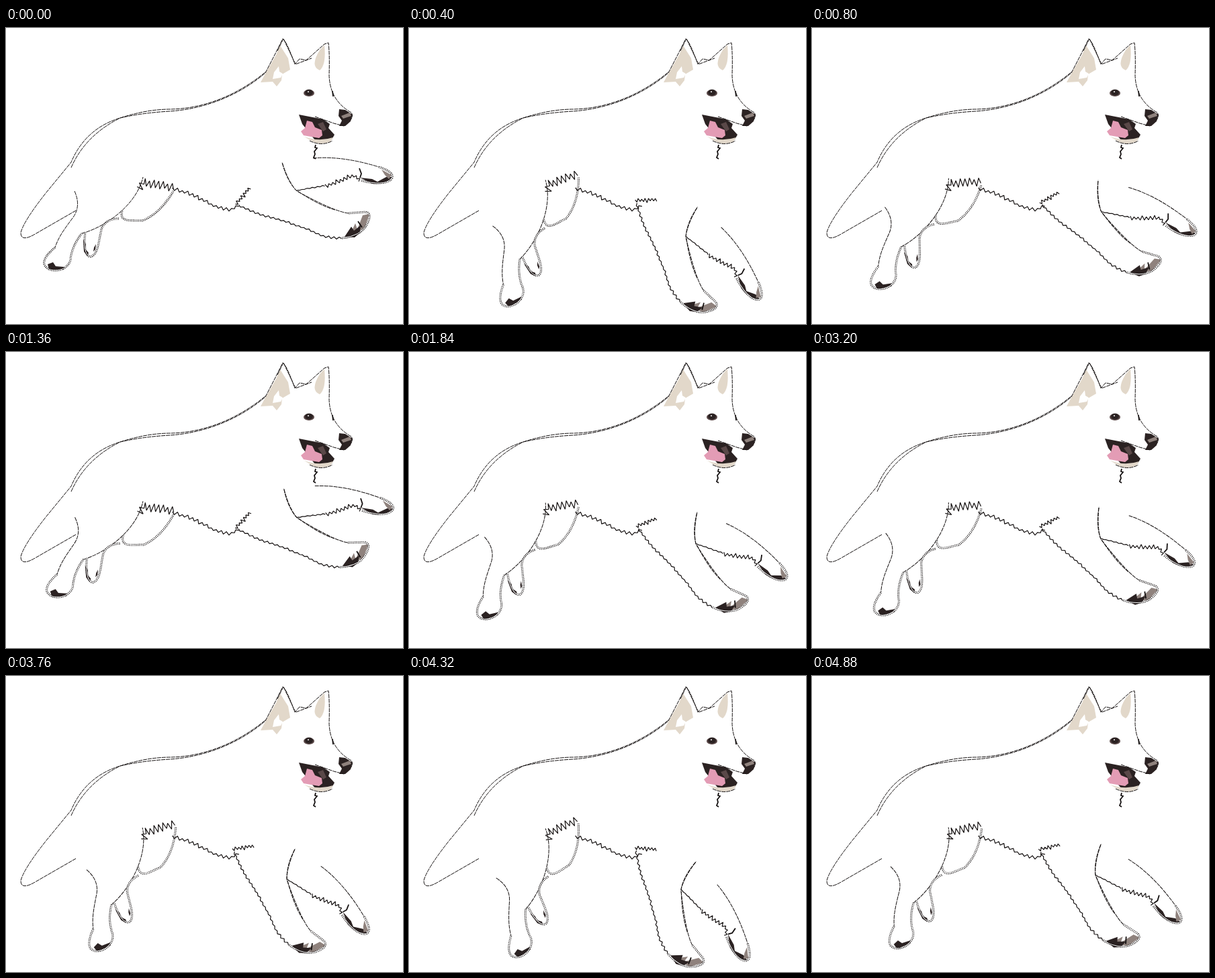
Recreate the animation shown at these times as an HTML page. Size 591x441 px, loop 4.96 s.

```html
<!DOCTYPE html>
<html lang="en">
<head>
<meta charset="utf-8">
<title>Running white dog</title>
<style>
  html, body { margin: 0; width: 100%; height: 100%; overflow: hidden; background: #fff; }
  svg { display: block; width: 591px; height: 441px; }
  .line, .twin, .gap, .fur, .ink { fill: none; stroke: #151111; }
  .line { stroke-dasharray: 6 1; }
  .twin { stroke-width: 2.8; stroke-dasharray: 1.5 1; }
  .gap { stroke: #fff; stroke-width: 1; }
  .fur { stroke-width: 1.2; stroke-linejoin: bevel; }
  .ink { stroke-width: 1.8; }
  .dark { fill: #2b2222; }
  .brown { fill: #5a4848; }
  .grey { fill: #8f827d; }
  .pale { fill: #e2d8ca; }
  .pink { fill: #e39cb5; }
  .white { fill: #fff; }
</style>
</head>
<body>
<svg viewBox="0 0 591 441" xmlns="http://www.w3.org/2000/svg">
  <g id="hind">
    <path class="dark" d="M62 352L70 349L74 355L87 356L86 360L64 360Z"/>
    <path class="dark" d="M115 315L119 322L118 329L123 335L121 340L116 333ZM131 327L134 322L133 330L130 333Z"/>
    <path class="line" d="M102 243Q112 265 100 282C85 302 78 312 73 327M113 306C150 296 195 262 204 222"/>
  </g>
  <g id="body">
    <!-- tail and back -->
    <path class="line" d="M104 272L45 306Q22 320 22 305Q26 288 60 245L97 200Q118 150 170 134Q210 121 245 121C300 120 350 96 387 65"/>
    <path class="line" d="M97 208Q118 160 170 134Q205 126 245 124C300 120 350 98 386 67"/>
    <!-- ears and face -->
    <path class="pale" d="M408 26L420 45L423 62L411 69L410 78L403 87L397 80L379 81L386 68L402 40Z"/>
    <path class="white" d="M399 66L406 57L407 65L412 68L409 74L397 76Z"/>
    <path class="pale" d="M474 25Q477 55 467 63Q452 57 467 33Z"/>
    <path class="line" d="M386 67L400 40L412 16Q417 18 430 54L437 46L447 48L456 40L474 24L480 22Q482 40 481 70Q482 108 514 126Q520 134 503 146"/>
    <path class="line" d="M404 34L413 16L431 54L455 45"/>
    <ellipse class="brown" cx="451" cy="97" rx="8" ry="5"/>
    <ellipse class="dark" cx="451" cy="96" rx="6" ry="4.5"/>
    <circle class="white" cx="450" cy="95" r="1"/>
    <path class="ink" d="M486 94L487 102"/>
    <path class="dark" d="M496 121L505 122L516 129L513 139L505 146L496 146L500 138L495 131Z"/>
    <path class="grey" d="M499 131L512 126L514 131L502 135Z"/>
    <!-- mouth -->
    <path class="dark" d="M436 129L472 136L482 143L480 149L489 159L485 166L472 170L460 167L441 143Z"/>
    <path class="brown" d="M464 143L472 140L477 151L472 154Z"/>
    <path class="pink" d="M448 138L456 140L460 148L470 152L471 160L466 164L443 160L439 154L445 149Z"/>
    <path class="pale" d="M444 162Q466 170 487 163L483 169Q470 175 458 170Z"/>
    <path class="line" d="M452 168Q470 177 486 168M460 132L488 142L503 146"/>
    <path class="ink" d="M461 174L460 178L463 179L459 184L460 188L458 193L461 195"/>
  </g>
  <g id="front">
    <path class="dark" d="M527 223L545 225L553 229L566 222L575 222Q565 234 545 232Z"/>
    <path class="grey" d="M559 211L574 219L570 225L564 219Z"/>
    <path class="grey" d="M512 308L520 291L523 300L531 279L541 277L534 298Z"/>
    <path class="dark" d="M504 311L514 296L518 302L528 294L527 305L519 312Z"/>
    <path class="ink" d="M526 209L529 217L527 223M524 288L530 297"/>
    <path class="line" d="M457 194Q500 190 555 207M510 276Q490 274 433 243Q418 228 411 200"/>
    <path class="line" d="M490 271Q465 264 431 241Q419 226 411 200"/>
  </g>
</svg>
<script>
const $ = id => document.getElementById(id);

let seed = 7;
function random() {
  seed = (seed * 16807) % 2147483647;
  return seed / 2147483647;
}

function draw(group, cls, d) {
  const path = document.createElementNS('http://www.w3.org/2000/svg', 'path');
  path.setAttribute('class', cls);
  path.setAttribute('d', d);
  $(group).appendChild(path);
  return path;
}

// dotted double outline
function twin(group, d) {
  draw(group, 'twin', d);
  draw(group, 'gap', d);
}

// jagged line that zigzags across a smooth guide
function fur(group, guide, step, amp) {
  const path = draw(group, 'fur', guide);
  const length = path.getTotalLength();
  const count = Math.round(length / step);
  const points = [];
  for (let i = 0; i <= count; i++) {
    const s = length * i / count;
    const a = path.getPointAtLength(s - 1), b = path.getPointAtLength(s + 1);
    const side = (i % 2 ? 1 : -1) * amp * (.2 + .8 * random());
    const along = Math.hypot(b.x - a.x, b.y - a.y);
    points.push([(a.x + b.x) / 2 - side * (b.y - a.y) / along,
                 (a.y + b.y) / 2 + side * (b.x - a.x) / along].map(v => v.toFixed(1)));
  }
  path.setAttribute('d', 'M' + points.join('L'));
}

twin('hind', 'M73 327Q55 342 57 352C62 366 92 364 96 345Q98 325 113 306');
twin('hind', 'M173 272C168 290 185 286 203 287Q230 276 249 243');
twin('hind', 'M168 284Q148 284 142 300L138 320Q134 340 125 341Q114 336 118 304');
twin('front', 'M555 207Q580 215 574 225Q562 236 528 227');
twin('front', 'M500 313Q528 310 537 293Q546 276 535 274L510 276');

fur('hind', 'M196 238L204 230L250 238', 3.5, 8);
fur('body', 'M247 240Q268 242 300 260T346 264', 4, 3);
fur('front', 'M343 264Q352 250 363 238', 2.5, 4);
fur('front', 'M346 264Q368 276 400 284T455 303T500 313', 4, 1.8);
fur('front', 'M433 242L475 235', 4, 1);
fur('front', 'M475 235Q490 230 505 223T528 227', 3, 4);

const STEP = 80, LOOP = 4960, SWING = 664.5, LAG = .022;

function turn(id, angle, x, y) {
  $(id).setAttribute('transform', `rotate(${angle.toFixed(2)} ${x} ${y})`);
}

function pose(now) {
  const t = Math.floor((now % LOOP) / STEP) * STEP;
  const phase = Math.max(0, t / SWING - LAG) % 1;
  const swing = 1 - Math.abs(1 - 2 * phase);
  turn('front', 57.5 * swing, 346, 254);
  turn('hind', -35 * swing, 212, 226);
}

let start;
function tick(now) {
  start ??= now;
  pose(now - start);
  requestAnimationFrame(tick);
}
pose(0);
requestAnimationFrame(tick);
</script>
</body>
</html>
```
